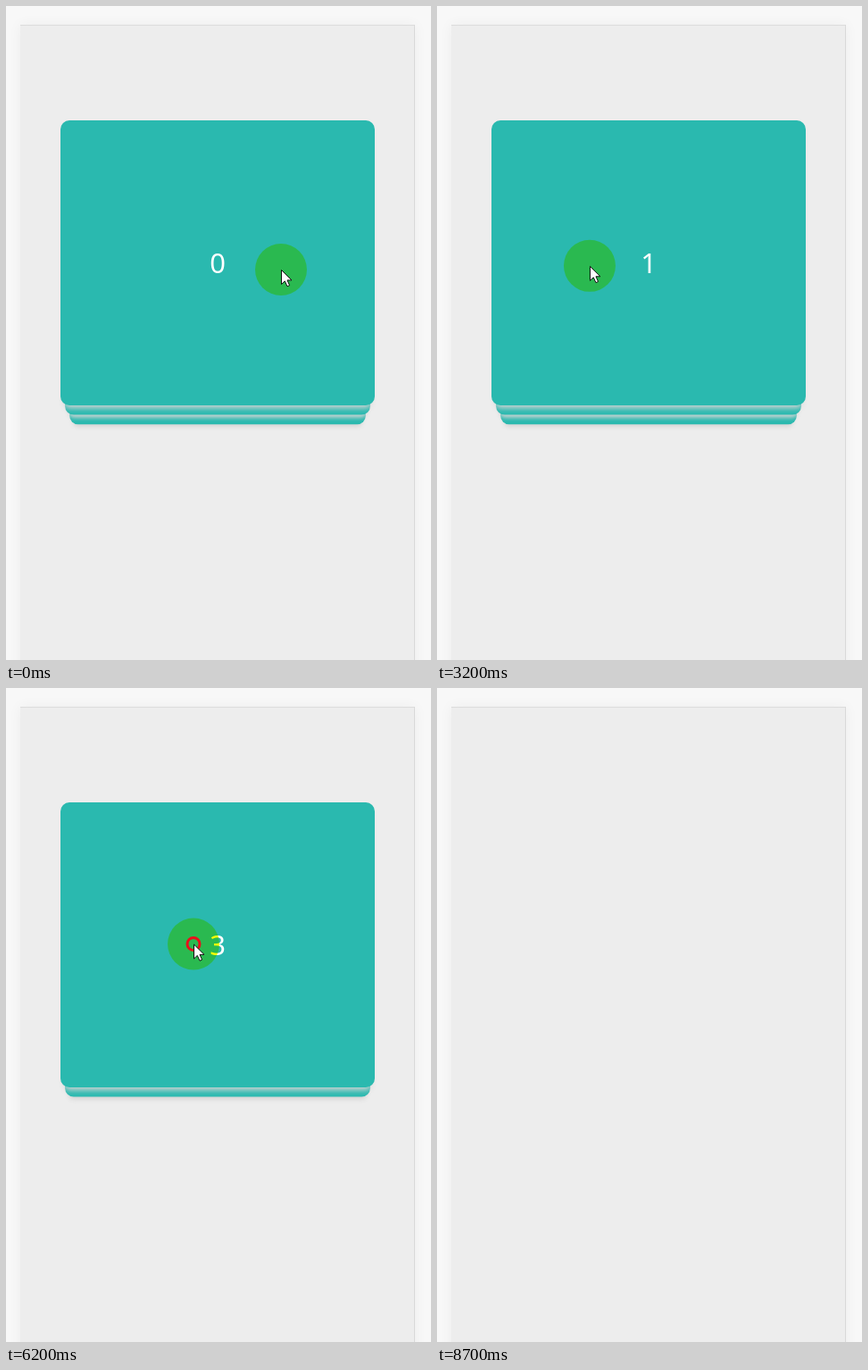
Animation of 476x732 px, one loop 9200 ms. Source, as an HTML page:

```html
<!DOCTYPE html>
<html lang="en">
<head>
<meta charset="utf-8">
<title>Card stack</title>
<style>
  html, body { margin: 0; width: 100%; height: 100%; overflow: hidden; }
  #stage {
    position: relative; width: 476px; height: 732px;
    overflow: hidden; isolation: isolate; background: #f8f8f8;
  }
  #panel {
    position: absolute; left: 16px; top: 21px; width: 441px; height: 740px;
    overflow: hidden; isolation: isolate; background: #ededed;
    box-sizing: border-box; border-top: 1px solid #dcdcdc;
  }
  #edge {
    position: absolute; left: 16px; top: 21px; width: 441px; height: 740px;
    border-right: 1px solid #d9d9d9; box-shadow: 0 0 14px rgba(0, 0, 0, .05);
  }
  .card {
    position: absolute; left: 45px; top: 106px; width: 352px; height: 319px;
    border-radius: 10px; background: #2ab9af; color: #fff;
    box-shadow: 0 7px 6px -4px #d4d4d4; transform-origin: 50% 100%;
    font: 500 31px/319px "Noto Sans", "Open Sans", sans-serif; text-align: center;
  }
  #bar {
    position: absolute; left: 451px; top: 25px; width: 3px; height: 678px;
    background: #d3d6d7; border-radius: 1px;
  }
  #halo {
    position: absolute; left: -29px; top: -29px; width: 58px; height: 58px;
    border-radius: 50%; background: #00f; mix-blend-mode: difference;
  }
  #pointer { position: absolute; left: 0; top: 0; overflow: visible; }
</style>
</head>
<body>
<div id="stage">
  <div id="edge"></div>
  <div id="panel"></div>
  <div id="bar"></div>
  <div id="halo"></div>
  <svg id="pointer" width="20" height="20">
    <circle id="ring" r="7" fill="none" stroke="#e8101a" stroke-width="3"/>
    <path d="M.5 .5V16.5L4.3 12.9L7 18.8L9.6 17.6L7 11.9H12Z" fill="#fff" stroke="#111"/>
  </svg>
</div>
<script>
const LOOP = 9200, STEP = 100, FLY = 300, WIDTH = 352, SHOWN = 3, EXIT = 8700;
const $ = id => document.getElementById(id);
const clamp = v => Math.max(0, Math.min(1, v));
const smooth = u => u * u * (3 - 2 * u);
const easeOut = u => 1 - (1 - u) ** 2;

// One drag per card
const swipes = [
  { press: 2100, release: 2600, from: 315, to: 119 },
  { press: 3300, release: 4000, from: 174, to: 312 },
  { press: 4700, release: 5300, from: 230, to: 357 },
  { press: 6200, release: 6700, from: 210, to: 32 },
  { press: 7200, release: 7500, from: 255, to: 152 }
];

// The hand levels out slowly while it swipes.
const swipeY = t => 286 + 5 * ((7600 - t) / 4400) ** 2;

// Pointer key points: time, x, y
const path = [
  [0, 308, 295], [300, 287, 282], [600, 298, 290],
  [800, 301, 278], [1300, 288, 252], [1800, 320, 273],
  ...swipes.flatMap(s => [
    [s.press, s.from, swipeY(s.press)], [s.release, s.to, swipeY(s.release)]
  ]),
  [7700, 126, 286], [8150, 352, 222], [8300, 345, 328], [EXIT, 480, 800]
];

const cards = swipes.map((_, i) => {
  const card = document.createElement('div');
  card.className = 'card';
  card.textContent = i;
  card.style.zIndex = -i;
  $('panel').append(card);
  return card;
});

function pointerAt(t) {
  const next = path.findIndex(p => p[0] > t);
  if (next < 0) return path[path.length - 1].slice(1);
  const [t0, x0, y0] = path[next - 1], [t1, x1, y1] = path[next];
  const u = smooth((t - t0) / (t1 - t0));
  return [x0 + (x1 - x0) * u, y0 + (y1 - y0) * u];
}

const flown = (t, swipe) => easeOut(clamp((t - swipe.release) / FLY));

function offsetAt(t, swipe) {
  if (t < swipe.press) return 0;
  const drag = pointerAt(Math.min(t, swipe.release))[0] - swipe.from;
  const exit = Math.sign(swipe.to - swipe.from) * WIDTH;
  return drag + (exit - drag) * flown(t, swipe);
}

function draw(t) {
  const gone = swipes.reduce((sum, s) => sum + flown(t, s), 0);
  cards.forEach((card, i) => {
    const x = offsetAt(t, swipes[i]);
    const depth = Math.max(0, i - gone);
    card.style.opacity = x ? clamp(1 - Math.abs(x) / WIDTH) : clamp(SHOWN - depth);
    card.style.transform =
      `translate(${x}px, ${depth * 10.6}px) scale(${1 - depth * .029})`;
  });

  const [x, y] = pointerAt(t);
  $('halo').style.transform = $('pointer').style.transform =
    `translate(${x}px, ${y}px)`;
  const show = (id, on) => $(id).style.display = on ? '' : 'none';
  show('halo', t < EXIT);
  show('pointer', t < EXIT);
  show('ring', swipes.some(s => t >= s.press && t < s.press + 200));
  show('bar', t >= 4300 && t < 5300);
}

const start = performance.now();
function tick() {
  const t = (performance.now() - start) % LOOP;
  draw(Math.floor(t / STEP) * STEP);
  requestAnimationFrame(tick);
}
tick();
</script>
</body>
</html>
```
